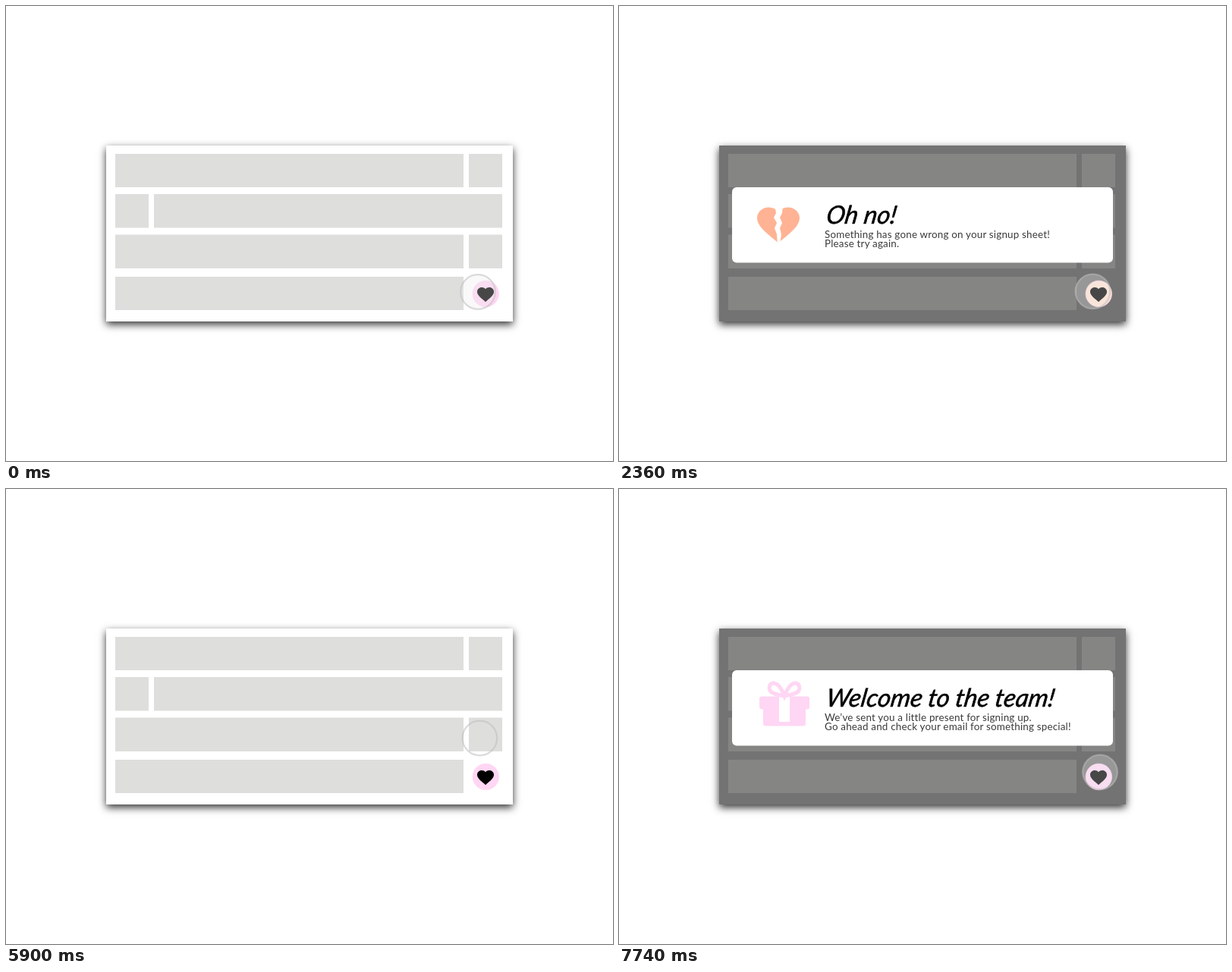
An HTML page that plays this animation: 800x600 px, repeating every 8000 ms.

```html
<!DOCTYPE html>
<html lang="en">
<head>
<meta charset="utf-8">
<title>Signup sheet</title>
<style>
  html, body { margin: 0; width: 100%; height: 100%; overflow: hidden; background: #fff; }
  svg { display: block; position: absolute; left: 0; top: 0; }
  .panel { position: absolute; left: 132px; top: 184px; width: 536px; height: 232px;
    background: #fff; box-shadow: 0 4px 10px rgba(0, 0, 0, .8); }
  .bars { fill: #a5a5a3; fill-opacity: .364; }
  .title { font: italic 33px Lato, sans-serif; stroke: #000; stroke-width: .5px; }
  .body { font: 13.4px Lato, sans-serif; letter-spacing: .2px; fill: #3a3a3a; }
</style>
</head>
<body>
<div class="panel"></div>
<svg width="800" height="600" viewBox="0 0 800 600">
  <defs>
    <clipPath id="clip"><rect x="132" y="184" width="536" height="232"/></clipPath>
    <path id="heart" d="M12 21.35l-1.45-1.32C5.4 15.36 2 12.28 2 8.5 2 5.42 4.42 3 7.5 3c1.74 0 3.41.81 4.5 2.09C13.09 3.81 14.76 3 16.5 3 19.58 3 22 5.42 22 8.5c0 3.78-3.4 6.86-8.55 11.54z"/>
    <rect id="card" x="149" y="239" width="502" height="99.6" rx="6" fill="#fff"/>
  </defs>

  <rect id="shade" x="132" y="184" width="536" height="232" fill-opacity=".55"/>
  <g class="bars">
    <path d="M144 195h459v44h-459zM610 195h44v44h-44zM144 248h44v44.5h-44zM195 248h459v44.5h-459z"/>
    <path d="M144 301.5h459v44.5h-459zM610 301.5h44v44.5h-44zM144 357h459v44h-459z"/>
  </g>

  <g clip-path="url(#clip)">
    <g id="error">
      <use href="#card"/>
      <use href="#heart" transform="translate(176.4 257.8) scale(2.8 2.56)" fill="#ffb394"/>
      <path fill="#fff" d="M205 262l2 11-3 6 4 7-3 7 3 8 1 14h3l2-14-2-8 3-7-3-7 3-6 1-11z"/>
      <text class="title" transform="translate(272 287) skewX(-9)">Oh no!</text>
      <text class="body" x="271" y="305.5">Something has gone wrong on your signup sheet!</text>
      <text class="body" x="271" y="317.7">Please try again.</text>
    </g>
    <g id="welcome">
      <use href="#card"/>
      <g fill="#ffd6f3">
        <rect x="185" y="273.5" width="66" height="17" rx="3"/>
        <rect x="190" y="284" width="56" height="28.5" rx="3"/>
        <rect x="211" y="274" width="14" height="33" fill="#fff"/>
        <path fill="none" stroke="#ffd6f3" stroke-width="5"
          d="M218 273C213 260 208 255.500 203 256C197 257 197 265 201 268C206 271 213 272 218 273C223 272 230 271 235 268C239 265 239 257 233 256C228 255.500 223 260 218 273z"/>
      </g>
      <text class="title" transform="translate(272 287) skewX(-9)">Welcome to the team!</text>
      <text class="body" x="271" y="305.5">We’ve sent you a little present for signing up.</text>
      <text class="body" x="271" y="317.7">Go ahead and check your email for something special!</text>
    </g>
  </g>

  <circle id="button" cx="632.3" cy="379.5" r="17.3" stroke="#ffd6f3" stroke-width=".6"/>
  <use href="#heart" transform="translate(618.8 367.8) scale(1.1 1.05)"/>
  <circle id="cursor" r="22.8" fill="#ebebeb" stroke="#bebebe" stroke-opacity=".55" stroke-width="2.2"/>
</svg>
<script>
  const LOOP = 8000, FADE = 400, DROP = 118;
  const ERROR_IN = 1418, ERROR_OUT = 4436, WELCOME_IN = 7340;
  const PINK = [255, 214, 243], PEACH = [255, 224, 210], PALE = [244, 238, 243];
  const $ = id => document.getElementById(id);
  const [shade, error, welcome, button, cursor] =
    ['shade', 'error', 'welcome', 'button', 'cursor'].map($);

  const part = (t, a, b) => Math.min(1, Math.max(0, (t - a) / (b - a)));
  const mix = (a, b, p) => a + (b - a) * p;
  const mixColor = (a, b, p) => a.map((v, i) => mix(v, b[i], p));
  const smooth = p => p * p * (3 - 2 * p);

  // cubic-bezier(.25, .1, .25, 1)
  function ease(x) {
    let lo = 0, hi = 1;
    for (let i = 0; i < 24; i++) {
      const s = (lo + hi) / 2, r = 1 - s;
      if (.75 * r * r * s + .75 * r * s * s + s * s * s < x) lo = s; else hi = s;
    }
    const s = lo, r = 1 - s;
    return .3 * r * r * s + 3 * r * s * s + s * s * s;
  }
  const fade = (t, start) => ease(part(t, start, start + FADE));

  // value of a piecewise linear track [time, value], ...
  function track(t, ...keys) {
    let value = keys[0][1];
    for (let i = 1; i < keys.length; i++)
      value = mix(value, keys[i][1], part(t, keys[i - 1][0], keys[i][0]));
    return value;
  }

  function showCard(card, p) {
    card.setAttribute('opacity', p);
    card.setAttribute('transform', `translate(0 ${DROP * (p - 1)})`);
  }

  function buttonColor(t) {
    if (t < ERROR_OUT) return mixColor(PINK, PEACH, fade(t, ERROR_IN));
    if (t < 4500) return mixColor(PEACH, PALE, part(t, ERROR_OUT, 4500));
    return mixColor(PALE, PINK, part(t, 4500, ERROR_OUT + FADE));
  }

  function fillOpacity(t) {
    if (t < 5900) return track(t, [1180, .3], [1300, .58], [1480, .3]);
    return track(t, [7190, 0], [7320, .58], [7500, .3]);
  }

  function draw(t) {
    const bad = fade(t, ERROR_IN) - fade(t, ERROR_OUT), good = fade(t, WELCOME_IN);
    shade.setAttribute('opacity', bad + good);
    showCard(error, bad);
    showCard(welcome, good);
    button.setAttribute('fill', `rgb(${buttonColor(t).map(Math.round)})`);

    const nudge = part(t, 880, 980);
    const up = smooth(part(t, 3570, 4270)), back = smooth(part(t, 6370, 7190));
    cursor.setAttribute('cx', 622 + 2.4 * nudge + 9.6 * back);
    cursor.setAttribute('cy', 377 - .7 * nudge - 47.8 * up + 44.8 * back);
    cursor.setAttribute('fill-opacity', fillOpacity(t));
  }

  const start = performance.now();
  function tick() {
    draw((performance.now() - start) % LOOP);
    requestAnimationFrame(tick);
  }
  tick();
</script>
</body>
</html>
```
